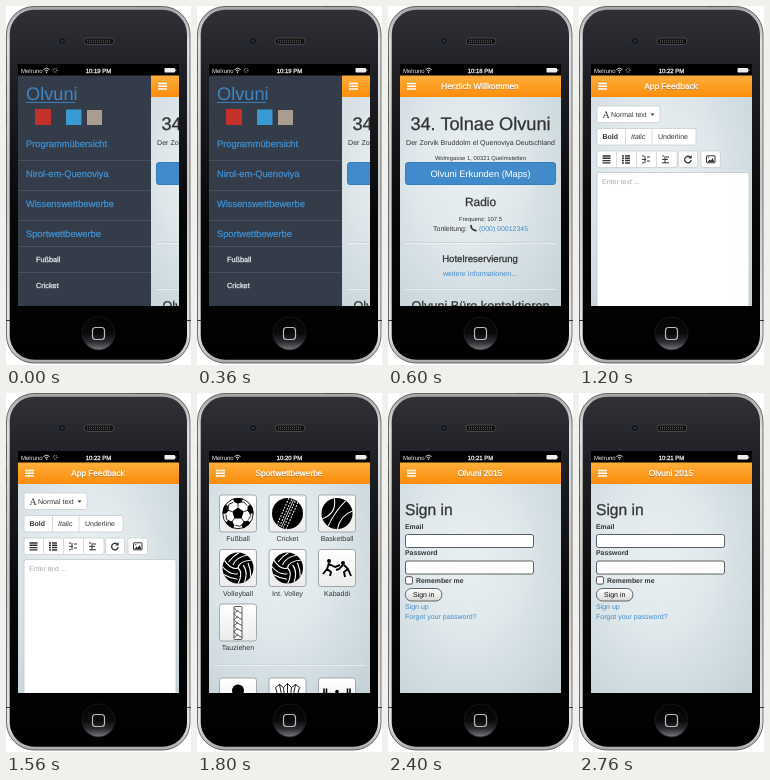
These frames come from a looping animation (185x359 px, 3 s). An HTML page:

```html
<!DOCTYPE html>
<html lang="de">
<head>
<meta charset="utf-8">
<style>
  html, body { margin: 0; width: 100%; height: 100%; overflow: hidden; background: #fff; }
  svg { display: block; width: 185px; height: 359px; }
  text { font-family: "Liberation Sans", Arial, sans-serif; white-space: pre; text-rendering: geometricPrecision; }
  .med { stroke: currentColor; stroke-width: .28px; }
</style>
</head>
<body>
<svg id="stage" viewBox="0 0 185 359"></svg>
<script>
const DARK = '#333', BLUE = '#428bca', MIDDLE = 92.5;

const rect = (x, y, w, h, fill, r = 0, more = '') =>
  `<rect x="${x}" y="${y}" width="${w}" height="${h}" rx="${r}" fill="${fill}" ${more}/>`;
const circle = (x, y, r, fill, more = '') =>
  `<circle cx="${x}" cy="${y}" r="${r}" fill="${fill}" ${more}/>`;
const line = (d, color, width = 1, more = '') =>
  `<path d="${d}" fill="none" stroke="${color}" stroke-width="${width}" ${more}/>`;
const shape = (d, fill) => `<path d="${d}" fill="${fill}"/>`;
const text = (x, y, size, str, color = DARK, more = '') =>
  `<text x="${x}" y="${y}" font-size="${size}" fill="${color}" color="${color}" ${more}>${str}</text>`;
const center = (x, y, size, str, color = DARK, more = '') =>
  text(x, y, size, str, color, 'text-anchor="middle" ' + more);
const group = (content, attrs) => `<g ${attrs}>${content}</g>`;
const at = (x, y, content) => group(content, `transform="translate(${x} ${y})"`);
const bold = 'font-weight="700"', medium = 'class="med"';

const stopList = stops => stops.map(([o, c]) => `<stop offset="${o}" stop-color="${c}"/>`).join('');
const gradient = (id, ...stops) =>
  `<linearGradient id="${id}" x1="0" y1="0" x2="0" y2="1">${stopList(stops)}</linearGradient>`;

const defs = '<defs>' +
  `<radialGradient id="page" cx=".42" cy=".42" r=".75">${stopList([[0, '#e9eff1'], [.4, '#e1e9ec'], [1, '#c6d4d9']])}</radialGradient>` +
  gradient('nav', [0, '#ffb03c'], [1, '#fb8c0c']) +
  gradient('rim', [0, '#a5a5a5'], [.1, '#e0e0e0'], [.5, '#c8c8c8'], [.92, '#e6e6e6'], [1, '#aaa']) +
  gradient('body', [0, '#303137'], [.2, '#1e1f24'], [.6, '#070708'], [1, '#000']) +
  gradient('home', [0, '#030303'], [.5, '#0a0a0b'], [.75, '#2b2c30'], [1, '#77797f']) +
  gradient('tile', [0, '#fff'], [1, '#ececec']) +
  gradient('pill', [0, '#fff'], [1, '#d8d8d8']) +
  '<clipPath id="screen"><rect x="12" y="58" width="161" height="242"/></clipPath>' +
  '<clipPath id="ball"><circle r="15.5"/></clipPath></defs>';

const phone =
  rect(128, 0, 25, 3, '#777', 1) +
  [[51, 15], [76, 14], [104, 14]].map(([y, h]) => rect(0, y, 2, h, '#777', 1)).join('') +
  rect(.5, .5, 183.5, 356.5, 'url(#rim)', 27.5, 'stroke="#4a4a4a" stroke-width=".8"') +
  line('M0 314.5H4M181 314.5H185', '#333') +
  rect(3.7, 3.7, 177.3, 350, 'url(#body)', 24.5) +
  circle(56, 35, 3.6, '#15161b', 'stroke="#33353c" stroke-width=".7"') + circle(56, 35, 1.3, '#2c3350') +
  rect(78, 32, 30, 6.5, '#111', 3.2, 'stroke="#555" stroke-width=".8"') +
  line('M81 34.2H105M81 36.3H105', '#666', 1.1, 'stroke-dasharray="1 1"') +
  circle(MIDDLE, 327.5, 16.5, 'url(#home)', 'stroke="#1c1c1e" stroke-width=".8"') +
  rect(86.5, 321.5, 12, 12, 'none', 3, 'stroke="#bbb" stroke-width="1.2"') +
  rect(12, 58, 161, 242, '#000');

const status = (time, busy) =>
  rect(12, 58, 161, 11.5, '#000') +
  text(15, 66.6, 6, 'Melruno', '#eee') +
  line('M37.5 63.5Q40.5 60.8 43.5 63.5M38.8 65Q40.5 63.5 42.2 65', '#eee', .9) +
  circle(40.5, 66.2, .7, '#eee') +
  (busy ? circle(49, 64.3, 1.8, 'none', 'stroke="#999" stroke-width="1.4" stroke-dasharray=".6 .8"') : '') +
  center(MIDDLE, 66.6, 6, time + ' PM', '#eee', medium) +
  rect(158.5, 62, 10.5, 4.6, '#eee', .8) + rect(169.3, 63.4, .9, 1.8, '#eee');

const navBar = title =>
  rect(12, 69, 161, 231, 'url(#page)') +
  rect(12, 69, 161, 22, 'url(#nav)') +
  line('M19 77.5H28M19 80.2H28M19 82.9H28', '#fff', 1.5) +
  center(92, 83.6, 8.3, title, '#7a4408', 'opacity=".6"') +
  center(92, 82.8, 8.3, title, '#fff', medium);

const rule = y => line(`M17 ${y}H168`, '#cdd5d8', 1) + line(`M17 ${y + 1}H168`, '#f2f6f7', .7);

const welcome = navBar('Herzlich Willkommen') +
  center(MIDDLE, 124, 18.2, '34. Tolnae Olvuni', DARK, medium) +
  center(MIDDLE, 139, 7.05, 'Der Zorvik Bruddolm el Quenoviya Deutschland') +
  center(MIDDLE, 154, 5.85, 'Wolmgasse 1, 00321 Quelmstetten') +
  rect(17.5, 156.5, 150, 22, BLUE, 2.5, 'stroke="#357ebd"') +
  center(MIDDLE, 171, 9.3, 'Olvuni Erkunden (Maps)', '#fff') +
  center(MIDDLE, 200, 11.9, 'Radio', DARK, medium) +
  center(MIDDLE, 215, 5.9, 'Frequenz: 107.5') +
  text(45, 225, 7, 'Tonleitung:') +
  line('M83 219.5Q83.2 224 88 224.6', DARK, 1.7, 'stroke-linecap="round"') +
  text(91, 225, 6.95, '(000) 00012345', BLUE) +
  rule(236.5) +
  center(92, 256, 9.6, 'Hotelreservierung', DARK, medium) +
  center(92, 270, 7.1, 'weitere Informationen...', BLUE) +
  rule(282.5) +
  center(MIDDLE, 304, 12.6, 'Olvuni Büro kontaktieren', DARK, medium);

const menu = () => {
  const items = ['Programmübersicht', 'Nirol-em-Quenoviya', 'Wissenswettbewerbe', 'Sportwettbewerbe'];
  return at(133, 0, welcome) +
    rect(12, 69, 133, 231, '#343b49') +
    text(20, 94, 18.2, 'Olvuni', '#3e86c4') + line('M20 96.5H69', '#3e86c4', .9) +
    rect(29, 103, 16, 16, '#c4302b') + rect(60, 103.5, 15.5, 15.5, '#3a9bd3') + rect(81, 104, 15, 15, '#a99c90') +
    items.map((s, i) => text(20, 141 + 30 * i, 9.3, s, '#3f8fd0', medium)).join('') +
    [154.5, 184.5, 214.5, 240.5, 266.5].map(y => line(`M12 ${y}H145`, '#48505e')).join('') +
    text(30, 256, 7.3, 'Fußball', '#e4e6ea', medium) +
    text(30, 282, 7.3, 'Cricket', '#e4e6ea', medium);
};

const buttons = (x, y, w, cuts = []) =>
  rect(x, y, w, 16.5, '#fff', 2, 'stroke="#c6cacc" stroke-width=".7"') +
  cuts.map(c => line(`M${c} ${y}v16.5`, '#ccc', .7)).join('');

const rows = (x, w) => [150, 152.3, 154.6, 156.9].map(y => `M${x} ${y}h${w}`).join('');

const feedback = navBar('App Feedback') +
  buttons(18, 100, 63) +
  text(23.5, 112.2, 10, 'A', DARK, 'style="font-family:Liberation Serif,serif"') +
  text(32, 111, 7, 'Normal text') + shape('M71.5 107.5h4l-2 2.2Z', DARK) +
  buttons(18, 122.5, 99, [46.5, 73]) +
  text(23.5, 133.4, 7, 'Bold', DARK, bold) +
  text(52, 133.4, 7, 'Italic', DARK, 'font-style="italic"') +
  text(79, 133.4, 7, 'Underline') +
  buttons(18, 145, 80, [37.5, 57.5, 77.5]) + buttons(99.5, 145, 19) + buttons(122, 145, 19.5) +
  line(rows(23.5, 8), DARK, 1.4) +
  line(rows(43, 2), DARK, 1.5) + line(rows(46, 5), DARK, 1.5) +
  line('M63 150h2M63 153.4h4M63 156.8h2M66 150v7M68 151h3M68 155h3', DARK, 1) +
  line('M83 150h2M83 153.4h6M83 156.8h7M86 150v7M87 151h3', DARK, 1) +
  line('M111 151A3.3 3.3 0 1 0 112.2 154', DARK, 1.3) + shape('M109.3 152.5h3.3v-3.5Z', DARK) +
  rect(127.5, 149.8, 8.5, 7, '#fff', .5, 'stroke="#333"') +
  shape('M128.5 156l2-2.5 1.2 1.2 2-2.7 1.6 4Z', DARK) + circle(129.7, 151.6, .7, DARK) +
  rect(18, 166.5, 152, 145, '#fff', 2, 'stroke="#c4c9cb" stroke-width=".8"') +
  text(23, 178, 7, 'Enter text ...', '#aaa');

// Sport icons, each drawn around its own centre
const clipped = content => group(content, 'clip-path="url(#ball)"');
const spin = (n, content) => Array.from({ length: n }, (_, i) =>
  group(content, `transform="rotate(${i * 360 / n})"`)).join('');
const soccer = circle(0, 0, 15.2, '#fff', 'stroke="#000" stroke-width=".9"') +
  clipped(shape('M0-6L5.7-1.9L3.5 4.9H-3.5L-5.7-1.9Z', '#000') +
    spin(5, line('M0-6V-11M0-11L6-11.5L9-8', '#000', .8) + shape('M-5-16L-4-11.5L0-9.8L4-11.5L5-16Z', '#000')));
const cricket = circle(0, 0, 15.5, '#000') + group(
  [-5, -2, 2, 5].map(x => line(`M${x}-14.5V14.5`, '#fff', 1, 'stroke-dasharray="1.8 1.3"')).join('') +
  line('M0-15V15', '#fff', .7), 'transform="rotate(24)"');
const basketball = circle(0, 0, 15.5, '#000') + clipped(group(
  line('M0-16Q-3 0 0 16M-12-12Q1 0-10 14M12-12Q3 0 10 14', '#fff', 1), 'transform="rotate(35)"'));
const volleyball = circle(0, 0, 15.5, '#000') +
  clipped(spin(3, line('M0 0Q1-7 14-8M-5-3Q-2-11 10-13M-9.5-6Q-5-12 2-16', '#fff', 1.1)));
const kabaddi = circle(-8, -7, 2, '#000') + circle(6, -5, 2, '#000') +
  line('M-8-5L-10 1L-6 4L-7 8M-10 1L-14 6M-8-4L-2-1L3-3', '#000', 1.9, 'stroke-linejoin="round"') +
  line('M7-3L11 1L7 4L8 9M11 1L14 8M6-3L2 1L-1 2', '#000', 1.9, 'stroke-linejoin="round"');
const rope = rect(-4, -16, 8, 33, '#fff', 1, 'stroke="#333" stroke-width=".8"') +
  [-12, -6, 0, 6, 12].map(y => line(`M-4 ${y - 3}Q-3 ${y} 4 ${y + 3}M-4 ${y + 3}L0 ${y}`, '#333', .8)).join('');
const head = circle(0, -6, 6, '#000') + rect(-11, 1, 22, 15, '#000', 5);
const shuttle = shape('M-12-9L-8-12L-4-9L0-13L4-9L8-12L12-9L7 8H-7Z', '#fff') +
  line('M-12-9L-8-12L-4-9L0-13L4-9L8-12L12-9L7 8H-7ZM-8-12L-4 8M-4-9L-2 8M0-13V8M4-9L2 8M8-12L4 8', '#000', .9);
const weights = line('M-16-3H16', '#000', 1.2) +
  [-13, -10.5, 10.5, 13].map(x => line(`M${x}-8V2`, '#000', 1.6)).join('') +
  circle(0, -5, 1.8, '#000') + line('M-6-3L-3 2H3L6-3', '#000', 1.6);

const sports = () => {
  const tiles = [
    [soccer, 'Fußball'], [cricket, 'Cricket'], [basketball, 'Basketball'],
    [volleyball, 'Volleyball'], [volleyball, 'Int. Volley'], [kabaddi, 'Kabaddi'],
    [rope, 'Tauziehen']
  ];
  const tile = (x, y, icon) => at(x, y,
    rect(-18.5, -18.5, 37, 37, 'url(#tile)', 2.5, 'stroke="#9ba1a3" stroke-width=".9"') + icon);
  return navBar('Sportwettbewerbe') +
    tiles.map(([icon, name], i) => {
      const x = 41 + 49.5 * (i % 3), y = 120.5 + 54.5 * Math.floor(i / 3);
      return tile(x, y, icon) + center(x, y + 27.5, 7.1, name);
    }).join('') +
    rule(271.5) +
    [head, shuttle, weights].map((icon, i) => tile(41 + 49.5 * i, 303.5, icon)).join('');
};

const input = y => rect(17.5, y, 128, 13, '#fff', 2, 'stroke="#4b4f52" stroke-width=".9"');
const signIn = navBar('Olvuni 2015') +
  text(17, 122, 15.6, 'Sign in', DARK, medium) +
  text(17, 136, 6.9, 'Email', DARK, bold) + input(141.5) +
  text(17, 162.3, 6.9, 'Password', DARK, bold) + input(168) +
  rect(17.5, 183.7, 7, 7.4, '#fff', 1.5, 'stroke="#444" stroke-width=".9"') +
  text(28, 190.2, 6.9, 'Remember me', DARK, bold) +
  rect(17.4, 195.5, 36.5, 12.5, 'url(#pill)', 6, 'stroke="#555" stroke-width=".9"') +
  center(35.7, 204.3, 7, 'Sign in', '#111') +
  text(17, 215.6, 7, 'Sign up', BLUE) +
  text(17, 225.6, 7, 'Forgot your password?', BLUE);

const screens = [
  { time: '10:19', content: menu(), busy: true },
  { time: '10:18', content: welcome },
  { time: '10:22', content: feedback, busy: true },
  { time: '10:20', content: sports() },
  { time: '10:21', content: signIn }
];
const stage = document.getElementById('stage');
stage.innerHTML = defs + phone + screens.map(({ time, content, busy }) =>
  group(content + status(time, busy), 'class="view" clip-path="url(#screen)"')).join('');

const views = stage.querySelectorAll('.view');
function draw(now) {
  const current = Math.floor(now % 3000 / 600);
  views.forEach((view, i) => view.style.display = i === current ? '' : 'none');
  requestAnimationFrame(draw);
}
draw(performance.now());
</script>
</body>
</html>
```
